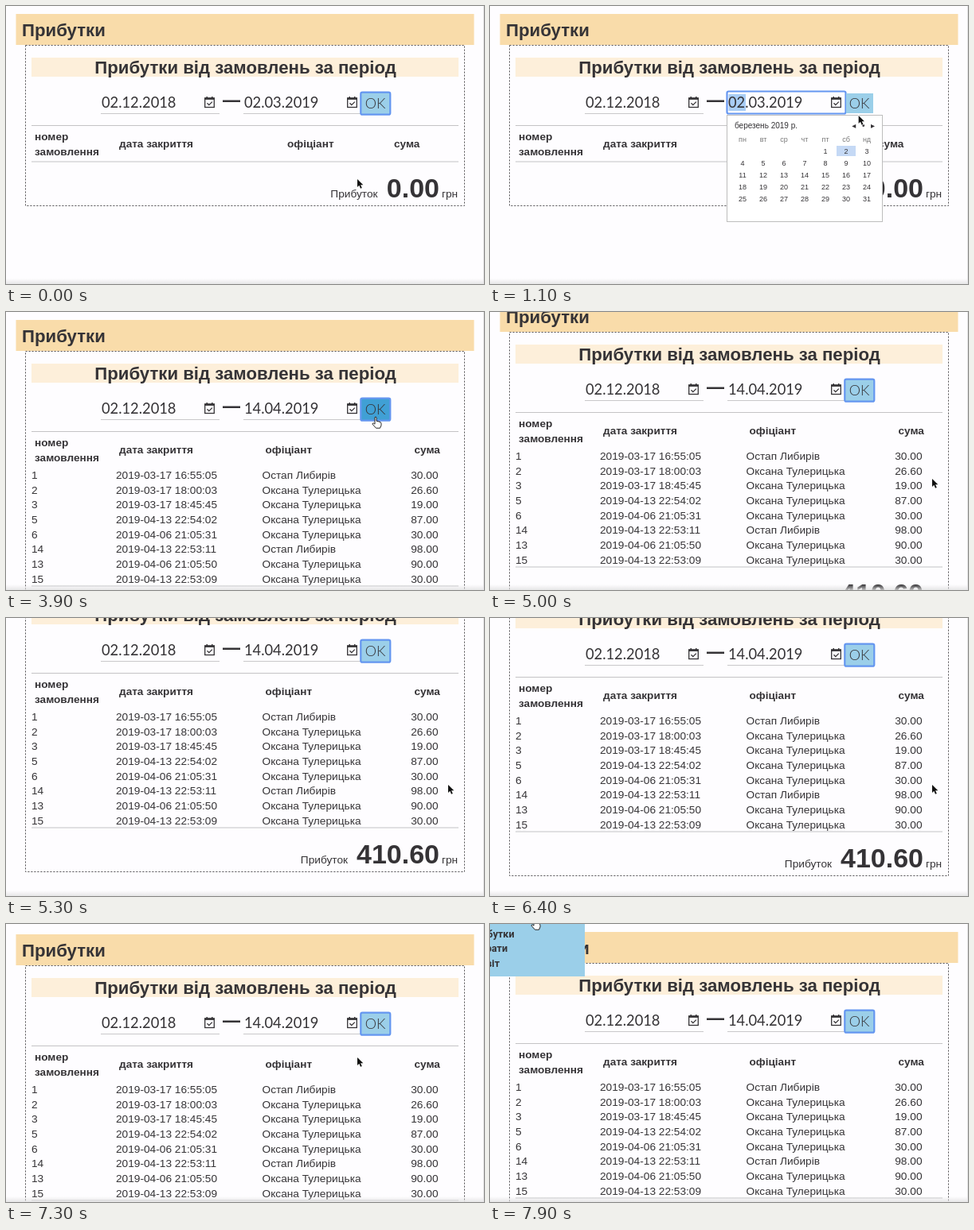
Animation of 600x350 px, one loop 8000 ms. Source, as an HTML page with a canvas:

```html
<!DOCTYPE html>
<html lang="uk">
<head>
<meta charset="utf-8">
<style>
  html, body { margin: 0; width: 100%; height: 100%; overflow: hidden; background: #fefdff; }
  canvas { display: block; width: 600px; height: 350px; }
</style>
</head>
<body>
<canvas id="stage"></canvas>
<script>
const canvas = document.getElementById('stage');
const ctx = canvas.getContext('2d');
const ratio = window.devicePixelRatio || 1;
canvas.width = 600 * ratio;
canvas.height = 350 * ratio;

const LOOP = 8000, STEP = 100;
const SANS = '"Liberation Sans", Arial, sans-serif';
const LATO = 'Lato, sans-serif';
const PAPER = '#fefdff', INK = '#353336', SKY = '#9bcfe9', RING = '#6496f0';

const waiters = ['Остап Либирів', 'Оксана Тулерицька'];
// number, closing time, waiter index, sum
const orders = [
  [1, '2019-03-17 16:55:05', 0, '30.00'],
  [2, '2019-03-17 18:00:03', 1, '26.60'],
  [3, '2019-03-17 18:45:45', 1, '19.00'],
  [5, '2019-04-13 22:54:02', 1, '87.00'],
  [6, '2019-04-06 21:05:31', 1, '30.00'],
  [14, '2019-04-13 22:53:11', 0, '98.00'],
  [13, '2019-04-06 21:05:50', 1, '90.00'],
  [15, '2019-04-13 22:53:09', 1, '30.00']
];

// Keys are [time, value, ...]
const scrollKeys = [
  [4800, 0], [4900, 6], [5000, 24], [5100, 50], [5200, 70], [5300, 81],
  [6300, 81], [6400, 76], [6500, 62], [6700, 28.4], [6900, 3], [7000, -5],
  [7100, -7], [7300, -3], [7500, 0]
];
const pointerKeys = [
  [0, 441, 218], [400, 434, 120], [900, 434, 120], [1200, 477, 147],
  [1500, 477, 147], [1900, 474, 196], [2000, 474, 196], [2200, 456, 150],
  [2300, 460, 134], [3000, 462, 132], [4300, 462, 132], [4600, 555, 210],
  [7100, 555, 210], [7200, 520, 198], [7300, 441, 168], [7500, 210, 65],
  [7700, 62, 0], [7900, 54, -7]
];
const menuKeys = [[7600, 0], [7900, 119]];

function valueAt(keys, t) {
  const next = keys.findIndex(k => k[0] > t);
  if (next < 0) return keys[keys.length - 1].slice(1);
  if (next === 0) return keys[0].slice(1);
  const a = keys[next - 1], b = keys[next];
  const p = (t - a[0]) / (b[0] - a[0]);
  return a.slice(1).map((v, i) => v + (b[i + 1] - v) * p);
}

function text(string, x, y, font, align = 'left', color = INK) {
  ctx.font = font;
  ctx.textAlign = align;
  ctx.fillStyle = color;
  ctx.fillText(string, x, y);
}

function box(x, y, w, h, color) {
  ctx.fillStyle = color;
  ctx.fillRect(x, y, w, h);
}

function focusRing(x, y, w, h) {
  ctx.strokeStyle = RING;
  ctx.lineWidth = 2.2;
  ctx.beginPath();
  ctx.roundRect(x, y, w, h, 2);
  ctx.stroke();
}

function calendarIcon(x, y) {
  ctx.strokeStyle = INK;
  ctx.lineWidth = 1.3;
  ctx.strokeRect(x + 0.7, y + 2, 11.6, 11.5);
  box(x, y + 1.5, 13, 2.4, INK);
  box(x + 2.5, y, 1.5, 2, INK);
  box(x + 9, y, 1.5, 2, INK);
  ctx.beginPath();
  ctx.moveTo(x + 3.5, y + 8.3);
  ctx.lineTo(x + 5.8, y + 10.6);
  ctx.lineTo(x + 9.8, y + 6.6);
  ctx.stroke();
}

function dateField(x, value, focused) {
  if (focused) {
    focusRing(x - 0.5, 107.5, 149, 28);
    box(x + 1.5, 111, 21.5, 21, '#a9cdf5');
  } else {
    box(x, 135, 149, 1, '#c9c8ca');
  }
  text(value, x + 1, 128, `18.3px ${LATO}`);
  calendarIcon(x + 130, 114);
}

function okButton(focused, hovered) {
  const fill = hovered ? '#40a0d5' : SKY;
  if (focused) {
    box(445, 109, 37, 27, fill);
    focusRing(445.3, 108.7, 37, 28);
  } else {
    box(447, 110, 34, 25, fill);
  }
  text('OK', 463.5, 128.5, `300 18px ${LATO}`, 'center');
}

function table(filled) {
  const head = `bold 13.6px ${SANS}`, body = `13.7px ${SANS}`;
  const grow = filled ? 149 : 0;
  box(32, 150, 536, 1, '#c4c3c5');
  text('номер', 36, 169, head);
  text('замовлення', 36, 187.5, head);
  text('дата закриття', 142, 178, head);
  text('офіціант', filled ? 325.5 : 353, 178, head);
  text('сума', filled ? 512.5 : 487, 178, head);
  if (filled) {
    orders.forEach(([id, closed, waiter, sum], i) => {
      const y = 210 + i * 18.65;
      text(id, 32, y, body);
      text(closed, 138, y, body);
      text(waiters[waiter], 321.5, y, body);
      text(sum, 542.5, y, body, 'right');
    });
  }
  box(32, 195.5 + grow, 536, 1, '#c4c3c5');
  const base = 240.6 + grow;
  text('Прибуток', filled ? 429 : 466.5, base, body, 'right');
  text(filled ? '410.60' : '0.00', 544, base, `bold 34px ${SANS}`, 'right');
  text('грн', 547, base, body);

  ctx.strokeStyle = '#5c5a5d';
  ctx.lineWidth = 1;
  ctx.setLineDash([2.2, 1.8]);
  ctx.strokeRect(24.5, 49.5, 551, 202 + grow);
  ctx.setLineDash([]);
}

function datePicker(april) {
  const left = 297, cell = 26, font = `9px ${SANS}`;
  box(left, 137, 196, 135, '#bdbdbd');
  box(left + 1, 138, 194, 133, '#fff');
  text(april ? 'квітень 2019 р.' : 'березень 2019 р.', left + 10, 154, `10px ${SANS}`);
  text('◂  •  ▸', left + 186, 154, '10px "DejaVu Sans", sans-serif', 'right');
  const center = column => left + 7 + (column + 0.5) * cell;
  ['пн', 'вт', 'ср', 'чт', 'пт', 'сб', 'нд'].forEach((name, i) =>
    text(name, center(i), 171, font, 'center', '#777'));
  const first = april ? 0 : 4, days = april ? 30 : 31, chosen = april ? 14 : 2;
  for (let day = 1; day <= days; day++) {
    const slot = first + day - 1, x = center(slot % 7);
    const y = 186 + Math.floor(slot / 7) * 15;
    if (day === chosen) box(x - 12, y - 10, 24, 13, '#c5d9f5');
    text(day, x, y, font, 'center');
  }
}

function menu(edge) {
  if (edge <= 0) return;
  box(0, 0, edge, 66, SKY);
  const font = 'bold 12.5px Roboto, sans-serif';
  text('Прибутки', edge - 88.5, 17, font, 'right');
  text('Витрати', edge - 97, 35, font, 'right');
  text('Звіт', edge - 107, 53.5, font, 'right');
}

const arrowShape = new Path2D('M0 0v10l2.3-2.2 1.7 4 1.8-.8-1.7-3.8h3.2z');
const handShape = new Path2D('M1 .5q1.5-1.2 2 .7v4l4 1q2 .5 2 2.5v2l-1.5 3.5h-5l-4.5-5q0-1.7 1.5-1.2l1.5 1.2z');

function pointer(x, y, hand) {
  ctx.save();
  ctx.translate(x, y);
  ctx.lineWidth = hand ? 1 : 1.4;
  ctx.strokeStyle = hand ? '#222' : '#fff';
  ctx.fillStyle = hand ? '#fff' : '#111';
  if (hand) ctx.fill(handShape);
  ctx.stroke(hand ? handShape : arrowShape);
  if (!hand) ctx.fill(arrowShape);
  ctx.restore();
}

function draw(t) {
  const [scroll] = valueAt(scrollKeys, t);
  const [x, y] = valueAt(pointerKeys, t);
  const hovered = t >= 2300 && t < 4500;
  const fieldFocused = t >= 400 && t < 2900;
  const title = `bold 22.2px ${SANS}`;

  ctx.setTransform(ratio, 0, 0, ratio, 0, 0);
  box(0, 0, 600, 350, PAPER);

  ctx.save();
  ctx.translate(0, -scroll);
  box(12.5, 10, 575, 39, '#f9dcaa');
  text('Прибутки', 20, 37.5, title);
  box(32, 65, 536, 24, '#fdefda');
  text('Прибутки від замовлень за період', 300.5, 85, title, 'center');
  dateField(119, '02.12.2018', false);
  box(272, 118.5, 22, 2.5, INK);
  dateField(298, t < 2000 ? '02.03.2019' : '14.04.2019', fieldFocused);
  okButton(!fieldFocused, hovered);
  table(t >= 3900);
  ctx.restore();

  const shade = ctx.createLinearGradient(0, 343, 0, 350);
  shade.addColorStop(0, 'rgba(225,225,225,0)');
  shade.addColorStop(1, 'rgba(225,225,225,.8)');
  box(0, 343, 600, 7, shade);
  box(599, 0, 1, 350, '#e2e1e3');

  if (t >= 600 && t < 2000) datePicker(t >= 1300);
  menu(valueAt(menuKeys, t)[0]);
  pointer(x, y, hovered || t >= 7700);
}

function frame() {
  const t = (performance.now() + 1) % LOOP;
  draw(Math.floor(t / STEP) * STEP);
  requestAnimationFrame(frame);
}
frame();
</script>
</body>
</html>
```
